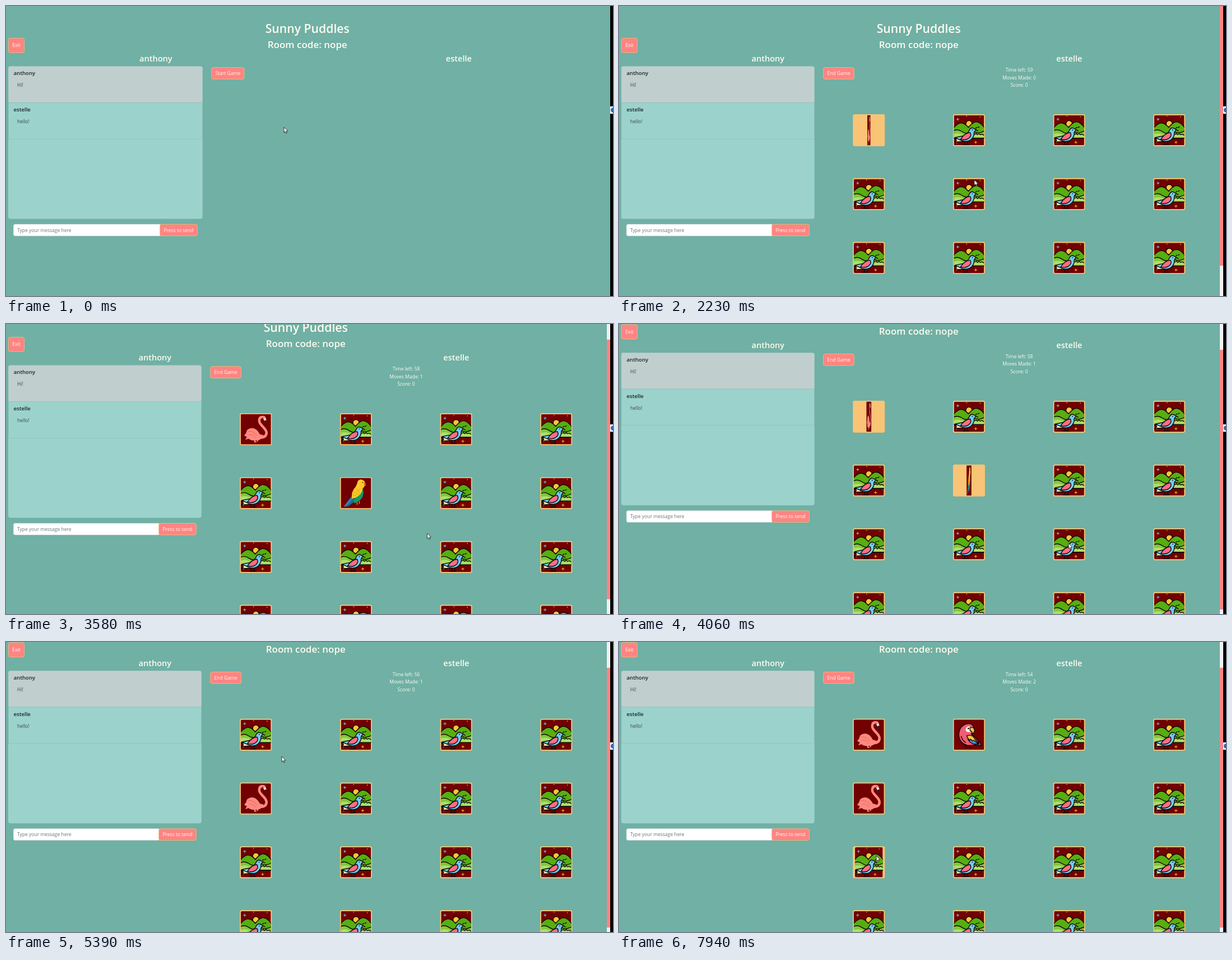
Write an HTML page that moves like this. It is 1083 by 517 pixels and loops after 8000 ms.

```html
<!DOCTYPE html>
<html lang="en">
<head>
<meta charset="utf-8">
<title>Memory game</title>
<style>
html, body { margin: 0; width: 100%; height: 100%; overflow: hidden; background: #70b0a5; }
svg { display: block; width: 100%; height: 100%; }
text { font: 8.5px "Open Sans", "Noto Sans", sans-serif; fill: #fffbee; }
.mid { text-anchor: middle; }
.h1 { font-size: 21.2px; font-weight: 600; }
.h2 { font-size: 17px; font-weight: 600; }
.h3 { font-size: 14.6px; font-weight: 600; }
.name { font-size: 9.6px; font-weight: 600; fill: #1c2427; }
.msg { fill: #3c4648; }
.hint { fill: #6c757d; }
.btn { fill: #fe8483; stroke: #f9c474; stroke-width: .8; }
.ink { stroke: #100507; stroke-width: 1.4; stroke-linejoin: round; stroke-linecap: round; }
</style>
</head>
<body>
<svg viewBox="0 0 1083 517" preserveAspectRatio="none">
  <defs>
    <clipPath id="square"><rect x="-26.8" y="-26.8" width="53.6" height="53.6" rx="1.5"/></clipPath>
    <rect id="base" x="-26.8" y="-26.8" width="53.6" height="53.6" rx="1.5" fill="#730000"/>

    <g id="back" clip-path="url(#square)">
      <use href="#base"/>
      <circle class="ink" cx="0" cy="-11.500" r="5.600" fill="#fcc53c"/>
      <path class="ink" fill="#58ad12" d="M-28-4Q-20-13-14-13Q-8-13-1-5Q7-15 13-15Q20-15 28-4V14H-28Z"/>
      <path class="ink" fill="#80c83a" d="M-28 1Q-20-3-13 2T2 5Q8 2 13 4T28 1V14H-28Z"/>
      <path fill="#abe069" d="M-28 7Q-18 3-9 9L9 9Q18 4 28 8V14H-28Z"/>
      <path class="ink" fill="none" d="M-28 14H28M10 7l3-1 2 2 3-2 2 2 3-1 4 2"/>
      <path stroke="#6fd3f5" d="M-20-22v5M-22.500-19.500h5"/>
      <path stroke="#fcc53c" d="M12 19v5M9.500 21.500h5M20-25v2M-4-26v2M-22 22v1"/>
      <path class="ink" fill="none" d="M-7 19L-8 25M-2 18L-3 25M-11 25.500h5M-5 25.500h5M12-4l2-1M14 0l2 1M16-5l2-1"/>
      <path class="ink" fill="#f8e5b0" d="M-13 12L-25 16L-22 18L-26 21L-9 20Z"/>
      <path class="ink" fill="#70cdf2" d="M13-1L9-3Q4-6 1-1Q-1 5-10 10L-25 13L-14 18Q-6 22 2 18Q10 12 9 4Q10 1 13-1Z"/>
      <path class="ink" fill="#ff6d83" d="M2 4Q-8 5-15 16Q-5 19 1 13Q5 9 2 4Z"/>
      <circle cx="6" cy="-.5" r=".9" fill="#100507"/>
    </g>

    <g id="flamingo">
      <use href="#base"/>
      <path stroke="#ff8a80" stroke-width="2" fill="none" d="M-2 18V22.500H1M3 17V22"/>
      <path fill="#ff8a80" d="M-21 11Q-17 8-16 2Q-12-2-6-2Q2-1 7 9L14 11Q10 20 1 20Q-8 21-13 17L-19 19L-16 14Z"/>
      <path stroke="#ff8a80" stroke-width="4.400" stroke-linecap="round" fill="none" d="M8 15Q19 15 19 6C18-3 6-7 6-15Q6-22 12-22Q16-22 16-18"/>
      <path fill="#f5dfdc" d="M13-20L18-19L19-15L15-15Z"/>
      <path fill="#28242c" d="M16-16L19-16Q20-12 17-10Z"/>
      <path stroke="#d95f59" stroke-width=".8" fill="none" d="M-14 4Q-4 2 2 12M-13 10Q-5 8 0 16"/>
      <circle cx="13" cy="-20.500" r=".7" fill="#28242c"/>
    </g>

    <g id="parrot">
      <use href="#base"/>
      <path fill="#2785b8" d="M-8 6L-22 24L-18 24L-3 12Z"/>
      <path fill="#176b9a" d="M-5 9L-17 25L-13 23L0 13Z"/>
      <path fill="#139b66" d="M8-11Q16-5 12 6Q8 15-4 18L-3 9Z"/>
      <path fill="#ffca28" d="M2-17Q3-25 10-24Q17-23 16-15Q15-11 12-8Q10 6-7 10Q-9 1-4-7Q0-11 2-17Z"/>
      <path stroke="#dc9b16" fill="none" d="M-5-3l4 3 4-4 4 3M-6 2l4 3 4-4 4 2M0-8l4 3 4-3"/>
      <path fill="#e5563c" d="M15-19Q19-17 17-12L14-15Z"/>
      <path stroke="#d98d55" stroke-width="1.500" d="M2 16v5M6 14v5"/>
      <circle cx="12" cy="-19" r=".9" fill="#282020"/>
    </g>

    <g id="macaw">
      <use href="#base"/>
      <path class="ink" fill="#4d8fd0" d="M0 11L19 13L22 19L10 19Z"/>
      <path class="ink" fill="#ef5d73" d="M-5-19Q6-22 9-12Q10-5 4-1Q15 7 18 16Q8 20-3 19Q-18 14-18 0Q-18-14-5-19Z"/>
      <path class="ink" fill="#fcc53c" d="M-4 2Q6-1 10 7L16 15Q1 15-4 2Z"/>
      <path class="ink" fill="#4d8fd0" d="M-2 8l3 2 2-2 3 3 3-1 8 7Q3 18-2 8Z"/>
      <path fill="#fff5ea" d="M-5-13Q0-17 4-13L4-5Q-4-3-6-8Z"/>
      <path class="ink" fill="#f7c54c" d="M2-13Q10-14 10-7Q9-3 6-1Q6-6 2-7Z"/>
      <path class="ink" fill="none" d="M-6 19v4h4M1 19v4h4M-14 3Q-12 10-6 14"/>
      <circle cx="-1" cy="-11" r="1.400" fill="#100507"/>
    </g>
  </defs>

  <rect width="1083" height="517" fill="#70b0a5"/>
  <g id="lobby"></g>
  <g id="game">
    <g id="page"></g>
    <rect x="1072" width="6" height="517" fill="#f1f1f1"/>
    <rect id="thumb" x="1072" width="6" height="463" fill="#fe8483"/>
  </g>
  <rect x="1078" width="5" height="517" fill="#000"/>
  <rect x="1078" y="179" width="5" height="13" fill="#fff"/>
  <circle cx="1083.500" cy="185.500" r="4.500" fill="#1b6cc4"/>
  <path id="cursor" fill="#fff" stroke="#111" stroke-width=".8" d="M0 0V9.600L2.200 7.600 3.700 11 5.300 10.300 3.800 7H6.800Z"/>
</svg>
<script>
const $ = id => document.getElementById(id);
const LOOP = 8000, FLIP = 600, SCROLL = 56.3;

const text = (x, y, s, cls = '') => `<text x="${x}" y="${y}" class="${cls}">${s}</text>`;
const box = (x, y, w, h, attrs) => `<rect x="${x}" y="${y}" width="${w}" height="${h}" ${attrs}/>`;
const button = (x, y, w, h, s) =>
  box(x + .4, y + .4, w - .8, h - .8, 'rx="3" class="btn"') + text(x + w / 2, y + h / 2 + 3.1, s, 'mid');

// Everything shared by both views, laid out for the given page width.
function layout(w, label, labelWidth) {
  const right = w / 3 - 8.6, send = right - 76.5;
  return text(w / 2 - 1.2, 48, 'Sunny Puddles', 'mid h1') +
    text(w / 2 - 1.2, 75, 'Room code: nope', 'mid h2') +
    text(w / 4 - 2.2, 99, 'anthony', 'mid h3') +
    text(w * .75 - .6, 99, 'estelle', 'mid h3') +
    button(4, 57, 29, 26.5, 'Exit') +
    box(4, 107.5, right - 4, 272, 'rx="4" fill="#9bd3cc"') +
    box(4.3, 107.8, right - 4.6, 64.4, 'rx="3" fill="#c0cfce" stroke="#acc3c0" stroke-width=".6"') +
    box(4.3, 172.2, right - 4.6, 64.8, 'fill="none" stroke="#85bdb5" stroke-width=".6"') +
    text(13.5, 123.3, 'anthony', 'name') + text(20, 144, 'Hi!', 'msg') +
    text(13.5, 188, 'estelle', 'name') + text(20, 209, 'hello!', 'msg') +
    box(13.3, 389.1, send - 11, 20.8, 'rx="3" fill="#fff" stroke="#ced4da" stroke-width=".6"') +
    text(20, 402.6, 'Type your message here', 'hint') +
    button(send, 388.8, 67.5, 21.4, 'Press to send') +
    button(w / 3 + 7, 109.3, labelWidth, 21.4, label);
}

// Card index, picture, and the times at which it turns over.
const flips = [
  [0, 'flamingo', [2045, 3900, 5530]],
  [5, 'parrot', [2830, 3900]],
  [4, 'flamingo', [4620]],
  [1, 'macaw', [6980]],
  [8, 'parrot', [7870]]
];

let cards = '';
for (let i = 0; i < 16; i++) {
  const x = 445.8 + i % 4 * 178.65, y = 221.5 + (i >> 2) * 113.8;
  cards += `<g transform="translate(${x} ${y})">` +
    box(-28.5, -28.5, 57, 57, 'rx="3" fill="#f9c476"') + `<use id="card${i}" href="#back"/></g>`;
}
$('lobby').innerHTML = layout(1078, 'Start Game', 59);
$('page').innerHTML = layout(1072, 'End Game', 55.5) +
  ['time', 'moves', 'score'].map((id, i) =>
    `<text id="${id}" class="mid" x="714" y="${117 + i * 13.5}">Score: 0</text>`).join('') + cards;

// Cursor stops: time, x, y
const path = [
  [0, 496, 216], [70, 496, 216], [560, 362, 134], [810, 393, 121], [870, 393, 121], [940, 394, 114],
  [1080, 394, 114], [1620, 439, 222], [1870, 439, 222], [1900, 442, 223], [2030, 442, 223],
  [2230, 634, 310], [2500, 630, 332], [2900, 630, 332], [3430, 709, 358], [3750, 802, 391],
  [4080, 802, 391], [4560, 452, 272], [5050, 452, 272], [5390, 492, 204], [5500, 456, 172],
  [6200, 456, 172], [6800, 626, 179], [7050, 626, 179], [7700, 459, 381], [LOOP, 459, 381]
];

const clamp = x => Math.min(1, Math.max(0, x));
const smooth = x => (x = clamp(x), x * x * (3 - 2 * x));

// cubic-bezier(.25, .1, .25, 1)
function ease(x) {
  x = clamp(x);
  let lo = 0, hi = 1;
  for (let i = 0; i < 24; i++) {
    const s = (lo + hi) / 2, r = 1 - s;
    if (.75 * s * r + s ** 3 < x) lo = s; else hi = s;
  }
  return .3 * lo * (1 - lo) ** 2 + 3 * lo * lo * (1 - lo) + lo ** 3;
}

function turn([index, art, times], t) {
  const past = times.filter(s => s <= t);
  let p = 0;
  if (past.length) {
    const e = ease((t - past[past.length - 1]) / FLIP);
    p = past.length % 2 ? e : 1 - e;
  }
  const c = Math.cos(Math.PI * p), card = $('card' + index);
  card.setAttribute('href', c < 0 ? '#' + art : '#back');
  card.setAttribute('transform', `scale(${Math.max(.001, Math.abs(c))} 1)`);
}

function render(t) {
  const playing = t >= 1080;
  $('lobby').style.display = playing ? 'none' : '';
  $('game').style.display = playing ? '' : 'none';

  const scrolled = smooth((t - 3490) / 160);
  $('page').setAttribute('transform', `translate(0 ${-SCROLL * scrolled})`);
  $('thumb').setAttribute('y', 46 * scrolled);
  $('time').textContent = 'Time left: ' + (t < 2100 ? 60 : 59 - Math.floor((t - 2100) / 1000));
  $('moves').textContent = 'Moves Made: ' + ((t >= 3500) + (t >= 5980));
  flips.forEach(f => turn(f, t));

  const i = path.findIndex(k => k[0] > t), a = path[i - 1], b = path[i];
  const k = smooth((t - a[0]) / (b[0] - a[0]));
  $('cursor').setAttribute('transform',
    `translate(${a[1] + (b[1] - a[1]) * k} ${a[2] + (b[2] - a[2]) * k})`);
}

const start = performance.now();
function tick() {
  render((performance.now() - start) % LOOP);
  requestAnimationFrame(tick);
}
tick();
</script>
</body>
</html>
```
